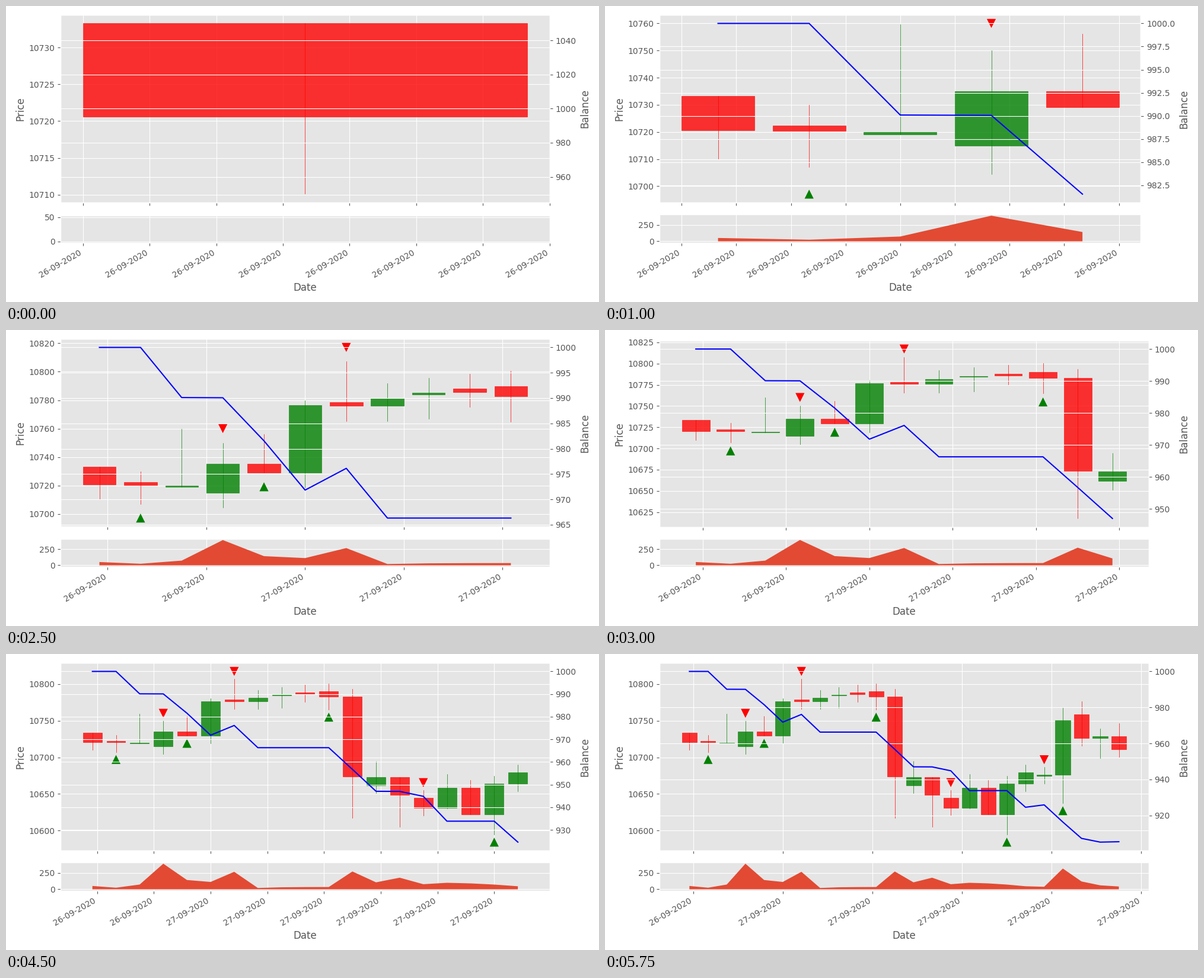
Write a matplotlib script that moves like this. It is 1000 px wide and 500 px high and loops after 6000 ms.

```python
import numpy as np
import matplotlib.pyplot as plt
import matplotlib.dates as mdates
from matplotlib.animation import FuncAnimation
from matplotlib.patches import Rectangle

plt.style.use("ggplot")

HOUR = 1 / 24
WIDTH = 0.8 * HOUR
START = mdates.date2num(np.datetime64("2020-09-26T19:00"))
FEE = 0.01

# hourly closing prices above 10000: the market's path
FIRST_OPEN = 733.3
CLOSES = [720.6, 720.3, 719.9, 735.1, 729.1, 776.5, 775.9, 781.5,
          785.1, 785.7, 782.8, 673.5, 673.0, 648.6, 631.0, 658.4,
          621.8, 664.1, 679.4, 676.2, 750.6, 726.0, 728.6, 710.8]

# notable opening gaps and wick lengths; the other hours use the usual ones
GAPS = {1: 1.7, 2: -1.3, 3: -5, 6: 1.9, 8: 2.6, 9: 2.9, 10: 4.3,
        12: -11.5, 14: -3.6, 19: -4.9, 21: 8}
USUAL_WICK = 10.5
UPPER = {0: 0, 1: 7.7, 2: 39.8, 3: 14.9, 4: 21, 5: 3.5, 6: 28.7,
         12: 21.6, 13: 0, 15: 19, 20: 18, 21: 18, 23: 18}
LOWER = {1: 13.2, 2: 0, 4: 0, 8: 17, 10: 18, 11: 56, 13: 43.8,
         15: 1, 16: 0, 17: 27.4, 20: 39, 22: 27}

# hours of trades, buying and selling in turn
TRADES = (1, 3, 4, 6, 10, 14, 17, 19, 20)
BUYS, SELLS = TRADES[::2], TRADES[1::2]

# volume is set at bursts and lulls, then settles to a quiet level
BURSTS = {0: 50.6, 1: 24, 2: 72.5, 3: 391, 5: 112, 6: 267, 7: 20,
          11: 272, 13: 177, 15: 99, 16: 90, 17: 72, 20: 317}
QUIET = 35


def make_candles():
    candles, previous = [], FIRST_OPEN
    for i, close in enumerate(CLOSES):
        start = previous + GAPS.get(i, 0)
        high = max(start, close) + UPPER.get(i, USUAL_WICK)
        low = min(start, close) - LOWER.get(i, USUAL_WICK)
        candles.append((start, high, low, close))
        previous = close
    return np.array(candles) + 10000


def make_balance(close):
    """Worth of the account, which follows the price while it holds coins."""
    worth, holding = [1000, 1000], False
    for i in range(1, len(close) - 1):
        value = worth[-1]
        if holding:
            value *= close[i] / close[i - 1]
        if i in BUYS:
            value /= 1 + FEE
        elif i in SELLS:
            value *= 1 - FEE
        if i in TRADES:
            holding = not holding
        worth.append(value)
    return worth


def make_volume(count):
    volume, level = [], QUIET
    for i in range(count):
        level = BURSTS.get(i, QUIET + 0.3 * (level - QUIET))
        volume.append(level)
    return volume


candles = make_candles()
worths = make_balance(candles[:, 3])
volumes = make_volume(len(candles))
times = START + np.arange(len(candles)) * HOUR

fig = plt.figure(figsize=(10, 5), dpi=100)


def draw_candle(ax, t, candle):
    start, high, low, end = candle
    color = "green" if end >= start else "red"
    ax.plot([t, t], [low, high], color=color, linewidth=0.5)
    ax.add_patch(Rectangle((t - WIDTH / 2, min(start, end)), WIDTH,
                           abs(end - start), facecolor=color,
                           edgecolor=color, alpha=0.8))


def draw_trades(ax, step):
    # a trade is marked one step after its candle closes
    for i in TRADES:
        if i >= step:
            break
        _, high, low, _ = candles[i]
        y, color, marker = ((low - 10, "green", "^") if i in BUYS
                            else (high + 10, "red", "v"))
        ax.scatter(times[i], y, c=color, s=120, edgecolors="none",
                   marker=marker)


def update(step):
    n = step + 1
    fig.clear()
    fig.subplots_adjust(left=0.125, right=0.9, top=0.88, hspace=0.2)
    grid = fig.add_gridspec(6, 1)
    price = fig.add_subplot(grid[:5])
    volume = fig.add_subplot(grid[5], sharex=price)
    balance = price.twinx()

    for t, candle in zip(times[:n], candles[:n]):
        draw_candle(price, t, candle)
    price.autoscale_view()
    volume.fill_between(times[:n], volumes[:n], 0)
    balance.plot(times[:n], worths[:n], color="blue")
    draw_trades(price, step)

    price.xaxis.set_major_formatter(mdates.DateFormatter("%d-%m-%Y"))
    fig.autofmt_xdate()
    volume.set_xlabel("Date")
    price.set_ylabel("Price")
    balance.set_ylabel("Balance")

    # keep a tick that falls exactly on the right edge
    left, right = price.get_xlim()
    price.set_xlim(left, right + 1e-9)
    fig.tight_layout()
    return []


anim = FuncAnimation(fig, update, frames=len(candles), interval=250,
                     repeat=True, cache_frame_data=False)
plt.show()
```
